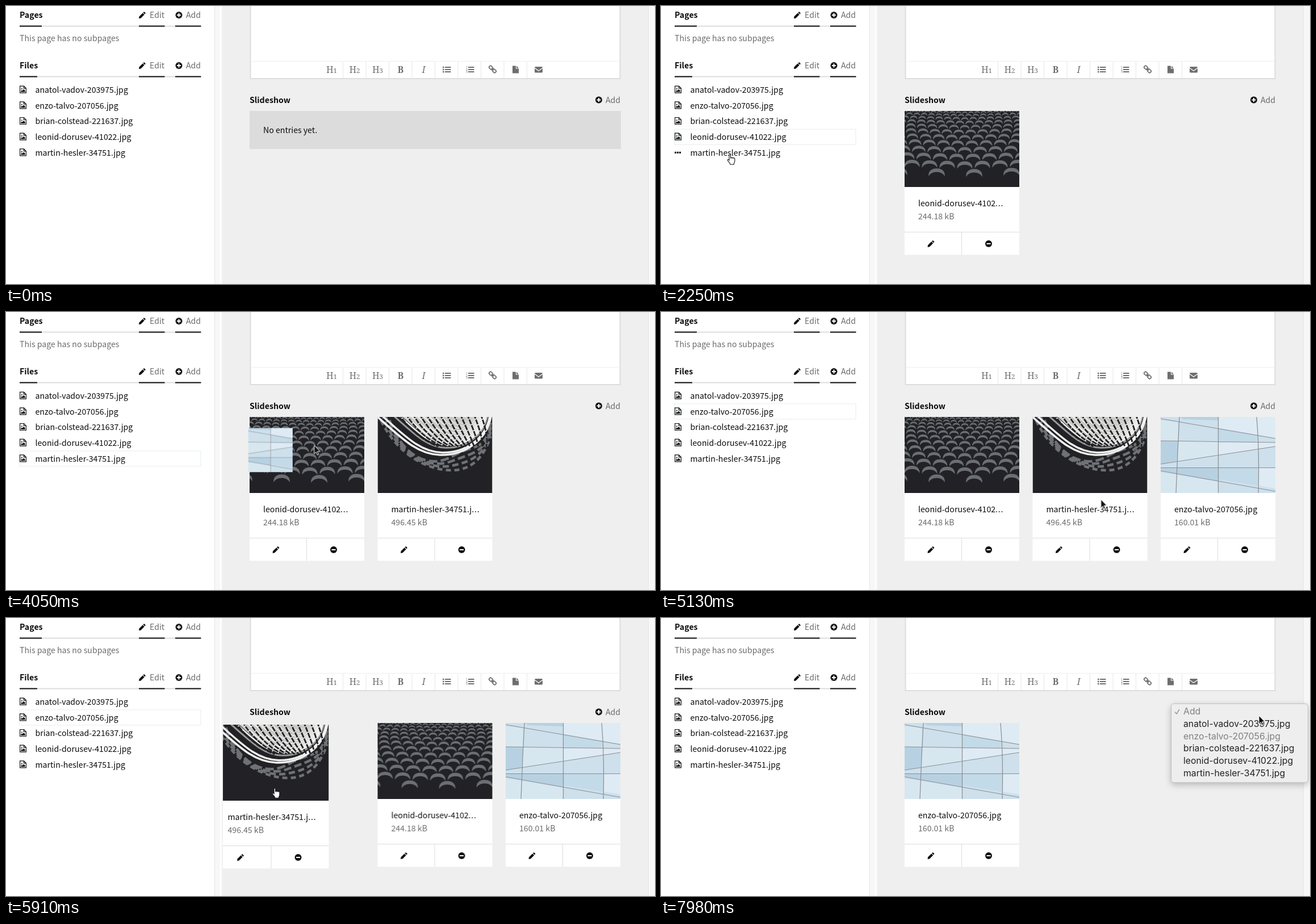
Recreate the animation shown at these times as an HTML page. Size 1143 px wide and 490 px high, loop 8000 ms.

```html
<!DOCTYPE html>
<html lang="en">
<head>
<meta charset="utf-8">
<title>Slideshow field</title>
<style>
  html, body { margin: 0; width: 100%; height: 100%; overflow: hidden; background: #fff; }
  svg { display: block; }
  #stage { width: 1143px; height: 490px; }
  text { font: 14.15px "Noto Sans CJK JP", "Noto Sans CJK SC", "Noto Sans", sans-serif; fill: #0c0c0c; white-space: pre; }
  .bold { font-weight: 600; }
  .dim { fill: #6c6c6c; }
  .dots { letter-spacing: .8px; }
  .tools text { font: 15.5px "Noto Serif", serif; fill: #6e6e6e; text-anchor: middle; }
  .tools .small { font-size: 11.5px; }
  .tools .tiny { font: 5px "Noto Sans", sans-serif; }
  .tools .strong { font-weight: 700; }
  .tools .slant { font-style: italic; }
  #menu text { font: 15.8px Inter, "Noto Sans", sans-serif; fill: #222; }
  #menu .dim { fill: #808080; }
  .shadow { filter: drop-shadow(0 4px 6px rgba(0, 0, 0, .22)); }
</style>
</head>
<body>
<svg id="stage" viewBox="0 0 1143 490">
  <defs>
    <path id="pencil" fill="#111" d="M8.5.6q.7-.7 1.4 0l1.5 1.5q.7.7 0 1.4l-1 1-2.9-2.9zM6.8 2.3l2.9 2.9-6.2 6.3L0 12l.5-3.5z"/>
    <g id="plus"><circle r="6" fill="#111"/><path d="M-3.5 0h7M0-3.5v7" stroke="#fff" stroke-width="2"/></g>
    <g id="minus"><circle r="6" fill="#111"/><path d="M-3.5 0h7" stroke="#fff" stroke-width="2"/></g>
    <g id="picture">
      <path d="M.6.6h6.9l3.9 3.9v8.1H.6zM7.4.6v4h4" fill="none" stroke="#111" stroke-width="1.2"/>
      <path d="M2.3 11V9.2l1.6-1.5 1.2 1 2.2-2.6 2.3 2.6V11z" fill="#111"/><circle cx="3.8" cy="5.6" r="1.1" fill="#111"/>
    </g>
    <symbol id="seats" viewBox="0 0 202 134" preserveAspectRatio="xMidYMid slice"></symbol>
    <symbol id="swirl" viewBox="0 0 202 134" preserveAspectRatio="xMidYMid slice"></symbol>
    <symbol id="glass" viewBox="0 0 202 134" preserveAspectRatio="xMidYMid slice">
      <path fill="#cde0ec" d="M0 0h202v134H0z"/>
      <path fill="#deebf4" d="M101 0h101v37L101 19zM101 45h101v7l-101 16zM172 90h30v36l-30-5z"/>
      <path fill="#d7e7f0" d="M0 6l30 3v33H0zM30 43h71v25l-71 11zM0 98l101 16v20H0z"/>
      <path fill="#b7d1e2" d="M0 42h31l-3 36-28 5zM0 89h101v24L0 95zM33 0h68v6L40 4z"/>
      <path fill="#c3dae8" d="M101 89h71v32l-71-11zM101 21l68 11v12l-68-2z"/>
      <path fill="none" stroke="#8b8d90" stroke-width="1.2" d="M33 0L30 60 27 134M101.500 0v134M169 0q5 60 3 134M0 42l202 3M0 89.500h202M0 3l202 35M0 83l202-31M0 95l202 36"/>
    </symbol>
    <clipPath id="panel"><path d="M382 0h749v490H382z"/></clipPath>
  </defs>

  <path fill="#fff" d="M0 0h1143v490H0z"/>
  <path fill="#f7f7f7" d="M367 0h776v490H367z"/>
  <path fill="#e6e6e6" d="M367 0h1v490h-1z"/>
  <path fill="#fff" d="M377 0h2v490h-2z"/>
  <path fill="#efefef" d="M381 0h750v490H381z"/>
  <path fill="#e6e6e6" d="M1131 0h1v490h-1z"/>

  <g id="sidebar"></g>

  <path fill="#fff" stroke="#ddd" stroke-width="2" d="M430.5-5h651v133h-651z"/>
  <g class="tools" id="tools"></g>

  <text class="bold" x="429" y="171">Slideshow</text>
  <use href="#plus" x="1044" y="165.5"/><text class="dim" x="1056" y="171">Add</text>

  <g id="empty">
    <path fill="#dcdcdc" d="M429 185h654v67H429z"/>
    <text x="453" y="224">No entries yet.</text>
  </g>
  <g id="cards" clip-path="url(#panel)"></g>
  <g id="thumbs"></g>
  <g id="menu"></g>

  <g id="cursor">
    <path id="arrow" fill="#111" stroke="#fff" d="M0 0v15l3.4-3.2 2.3 5.2 2.4-1-2.3-5.1h4.7z"/>
    <g id="hand"><path transform="translate(-4.5)" fill="#fff" stroke="#111" stroke-width="1.1" d="M3.5 1.2c0-1.6 2.6-1.6 2.6 0v5.3l.4-1c.6-.9 2.2-.6 2.3.5l.3-.4c.7-.7 2-.3 2.1.7l.3-.2c.9-.5 1.9.1 1.9 1.1v4c0 3-1.5 3.5-1.7 6H5.5C5 14.5 3 13.5 1 10.5c-1-1.6.8-2.6 2-1.4l.6.7z"/></g>
  </g>
</svg>

<script>
const LOOP = 8000;
const files = ['anatol-vadov-203975.jpg', 'enzo-talvo-207056.jpg', 'brian-colstead-221637.jpg',
  'leonid-dorusev-41022.jpg', 'martin-hesler-34751.jpg'];
const rowY = i => 148 + 27.7 * i;
const add = (id, markup) => document.getElementById(id).insertAdjacentHTML('beforeend', markup);
const range = (n, fn) => Array.from({ length: n }, (_, i) => fn(i)).join('');

// Photos
const dark = '<path fill="#222226" d="M0 0h202v134H0z"/>';

function seat(x, y, w) {
  const h = w * .34, rim = h * .45;
  return `M${x - w / 2} ${y + h}q${w * .08} ${-h} ${w / 2} ${-h}t${w / 2} ${h}v${rim}`
    + `q${-w * .14} ${-h * .8} ${-w / 2} ${-h * .8}t${-w / 2} ${h * .8}z`;
}
function seatRows() {
  let d = '', y = -1;
  for (let k = 0; k < 12; k++) {
    const gap = 11 + k * 2;
    for (let n = -11; n <= 11; n++) {
      const x = 106 + (n + (k % 2) / 2) * gap;
      if (k > 10 && n % 2) continue;
      d += seat(x, y + 2 - Math.abs(x - 106) * .03, gap * .86);
    }
    y += 4.5 + .95 * k;
  }
  return d;
}
add('seats', `${dark}<path fill="#6b6f73" d="${seatRows()}"/>`);

// Nested bowls shrink towards the upper right; the third is left out as a dark band
const bowl = 'M-165 4C-122 42-95 70-55 71S28 48 35 0';
add('swirl', dark + '<g fill="none">'
  + range(4, i => `<path d="M${6 + i * 3} ${6 - i * 7}C34 66 88 94 130 ${94 - i * 8}S190 62 199 ${34 - i * 8}" stroke="#6f7275"
      stroke-width="4.5" stroke-dasharray="${9 + i * 2} 6" stroke-dashoffset="${i * 7}"/>`)
  + '<g transform="translate(165 -4)">'
  + `<path d="${bowl}" transform="scale(.74)" fill="#c9c9c7"/>`
  + range(16, i => i == 2 ? '' : `<path d="${bowl}" stroke="${i == 3 ? '#9a9b9a' : '#f0f0ee'}" stroke-width="3.6"
      transform="scale(${1 - i * .06})"/>`)
  + range(13, i => `<path d="M${-128 + i * 12}-2Q${-100 + i * 11} 40 ${-58 + i * 7} 56" stroke="#222226" stroke-width="2.8"
      stroke-dasharray="9 2"/>`)
  + '</g></g>');

// Sidebar
function heading(title, y, end) {
  return `<text class="bold" x="24" y="${y + 5}">${title}</text>
    <use href="#pencil" x="234" y="${y - 6}"/><text class="dim" x="253" y="${y + 5}">Edit</text>
    <use href="#plus" x="304.5" y="${y}"/><text class="dim" x="317" y="${y + 5}">Add</text>
    <path stroke="#ddd" stroke-width="2" d="M24 ${y + 19.5}H343"/>
    <path stroke="#111" stroke-width="2" d="M24 ${y + 19.5}H${end}M234 ${y + 19.5}h45.5M298 ${y + 19.5}h45.5"/>`;
}
add('sidebar', heading('Pages', 16, 63) + '<text class="dim" x="24" y="62">This page has no subpages</text>'
  + heading('Files', 105, 55)
  + files.map((name, i) => `<g transform="translate(24 ${rowY(i)})">
      <path id="box${i}" opacity="0" fill="none" stroke="#e4edf0" d="M-.5-14h319.5v27H-.5z"/>
      <use href="#picture" y="-7.5"/>
      <g id="dots${i}" opacity="0"><path fill="#fff" d="M-.2-9h14v16H-.2z"/>
        <path fill="#111" d="M0-2h3v3H0zM4-2h3v3H4zM8-2h3v3H8z"/></g>
      <text x="27.5" y="5">${name}</text></g>`).join(''));

// Editor toolbar
const toolX = i => 573.5 + 40.5 * i;
const bars = x => `<path stroke="#6e6e6e" stroke-width="2" d="M${x - 3} 108h10.5M${x - 3} 112h10.5M${x - 3} 116h10.5"/>`;
add('tools', '<path stroke="#eee" d="M431.5 97.5h649"/>'
  + range(9, i => `<path stroke="#e8e8e8" d="M${593.5 + 40.5 * i} 98v29"/>`)
  + range(3, i => `<text x="${toolX(i)}" y="117.5">H<tspan class="small">${i + 1}</tspan></text>`)
  + `<text class="strong" x="${toolX(3)}" y="117.5">B</text><text class="slant" x="${toolX(4)}" y="117.5">I</text>`
  + bars(776) + range(3, i => `<path fill="#6e6e6e" d="M769 ${106.8 + 4 * i}h2.5v2.5h-2.5z"/>`)
  + bars(817) + range(3, i => `<text class="tiny" x="811.5" y="${110 + 4 * i}">${i + 1}</text>`)
  + `<g transform="translate(857 111.5) rotate(45)" fill="none" stroke="#6e6e6e" stroke-width="1.7">
      <rect x="-7.5" y="-2.5" width="7" height="5" rx="2"/><rect x=".5" y="-2.5" width="7" height="5" rx="2"/><path d="M-3 0h6"/></g>
    <path fill="#6e6e6e" d="M892 105.5h6v5h5v8h-11zM899 105.5l4 4h-4z"/>
    <path fill="#6e6e6e" d="M931 108.5q0-1.5 1.5-1.5h11q1.5 0 1.5 1.5l-7 5zM931 110l7 5 7-5v6q0 1.5-1.5 1.5h-11q-1.5 0-1.5-1.5z"/>`);

// Cards sit at the first slot and are moved by their tracks
const ellipsis = '<tspan class="dots">...</tspan>';
const card = (id, photo, name, size) => `<g id="${id}"><g transform="translate(429 185)">
  <path fill="#fff" d="M0 0h202v253.5H0z"/><use href="#${photo}" width="202" height="134"/>
  <text x="24" y="168">${name}</text><text class="dim" x="24" y="191">${size} kB</text>
  <path stroke="#ddd" fill="none" d="M0 213.5h202M100.5 214v39.5"/>
  <use href="#pencil" x="40.5" y="228"/><use href="#minus" x="148" y="234"/></g></g>`;
add('cards', card('cardA', 'seats', 'leonid-dorusev-4102' + ellipsis, '244.18')
  + card('cardC', 'glass', files[1], '160.01')
  + card('cardB', 'swirl', 'martin-hesler-34751.j' + ellipsis, '496.45'));

add('thumbs', ['seats', 'swirl', 'glass'].map((photo, i) =>
  `<g id="thumb${i}"><use href="#${photo}" width="78" height="78"/></g>`).join(''));

add('menu', `<rect class="shadow" x="898.5" y="151" width="241" height="139" rx="5" fill="#eee" stroke="#bbb"/>
  <path d="M905 165.5l3 3.5 5-8" fill="none" stroke="#999" stroke-width="1.5"/>`
  + ['Add', ...files].map((name, i) =>
    `<text class="${i == 0 || i == 2 ? 'dim' : ''}" x="920" y="${170 + 21.8 * i}">${name}</text>`).join(''));

// Motion: times are in ms within the loop
const rules = [], animations = {};
function animate(id, kind, body) {
  const name = `${id}-${kind}`;
  rules.push(`@keyframes ${name}{${body}}`);
  (animations[id] ||= []).push(`${name} ${LOOP}ms ease-in-out infinite`);
}
const pct = ms => `${ms / LOOP * 100}%`;
function show(id, ...spans) {
  const key = (ms, on) => `${pct(ms)}{opacity:${on};animation-timing-function:step-end}`;
  animate(id, 'show', key(0, 0) + spans.map(([from, to]) => key(from, 1) + key(to, 0)).join(''));
}
function track(id, ...points) {
  const key = ([ms, x, y, ease = 'ease-in-out']) =>
    `${pct(ms)}{transform:translate(${x}px,${y}px);animation-timing-function:${ease}}`;
  const [, ...start] = points[0], [, ...end] = points.at(-1);
  animate(id, 'move', [[0, ...start], ...points, [LOOP, ...end]].map(key).join(''));
}
const HOP = 'step-end', SLOT = 225.5;

show('empty', [0, 1500]);
show('cardA', [1500, 6990]);
track('cardA', [0, 0, 0, HOP], [5580, SLOT, 0, HOP], [6600, 0, 0, HOP]);
show('cardB', [2820, 6600]);
track('cardB', [0, SLOT, 0, HOP], [5250, SLOT, 0], [5880, SLOT - 288, 3], [5940, SLOT - 288, 3], [6090, 0, 0, HOP]);
show('cardC', [4410, 8000]);
track('cardC', [0, 2 * SLOT, 0, HOP], [6600, SLOT, 0, HOP], [6990, 0, 0, HOP]);

show('box3', [1500, 2820]);
show('box4', [2820, 4410]);
show('box1', [4410, 6600]);
show('dots3', [480, 900]);
show('dots4', [2130, 2430]);
show('dots1', [3600, 3780]);

show('thumb0', [930, 1500]);
track('thumb0', [930, 148, 224], [1020, 150, 224, 'ease-out'], [1320, 500, 222]);
show('thumb1', [2490, 2820]);
track('thumb1', [2490, 140, 258], [2790, 695, 300]);
show('thumb2', [3840, 4410]);
track('thumb2', [3840, 140, 174], [4350, 950, 260]);
show('menu', [7650, 8000]);

show('arrow', [30, 480], [900, 2130], [2430, 3600], [3780, 5230], [6120, 6380], [7160, 8000]);
show('hand', [480, 900], [2130, 2430], [3600, 3780], [5230, 6120], [6380, 7160]);
track('cursor', [30, 12, 374], [600, 132, 226], [900, 134, 227, 'ease-in'], [1020, 350, 243, 'ease-out'],
  [1320, 500, 232], [1530, 508, 232], [2190, 121, 262], [2400, 121, 262], [2730, 700, 320], [2820, 703, 340],
  [2940, 711, 387], [3090, 711, 390], [3630, 125, 179], [3780, 125, 179], [4320, 955, 290], [4440, 955, 292],
  [4860, 930, 471], [5130, 775, 331, 'ease-out'], [5220, 761, 297], [5250, 761, 297], [5880, 473, 300],
  [5940, 473, 300], [6090, 500, 297], [6480, 577, 416], [7110, 577, 416, 'ease-in'], [7320, 720, 345, 'ease-out'],
  [7590, 1060, 163], [7740, 1060, 163], [7950, 1053, 172]);

for (const id in animations) rules.push(`#${id}{animation:${animations[id].join()}}`);
const sheet = document.createElement('style');
sheet.textContent = rules.join('\n');
document.head.append(sheet);
</script>
</body>
</html>
```
